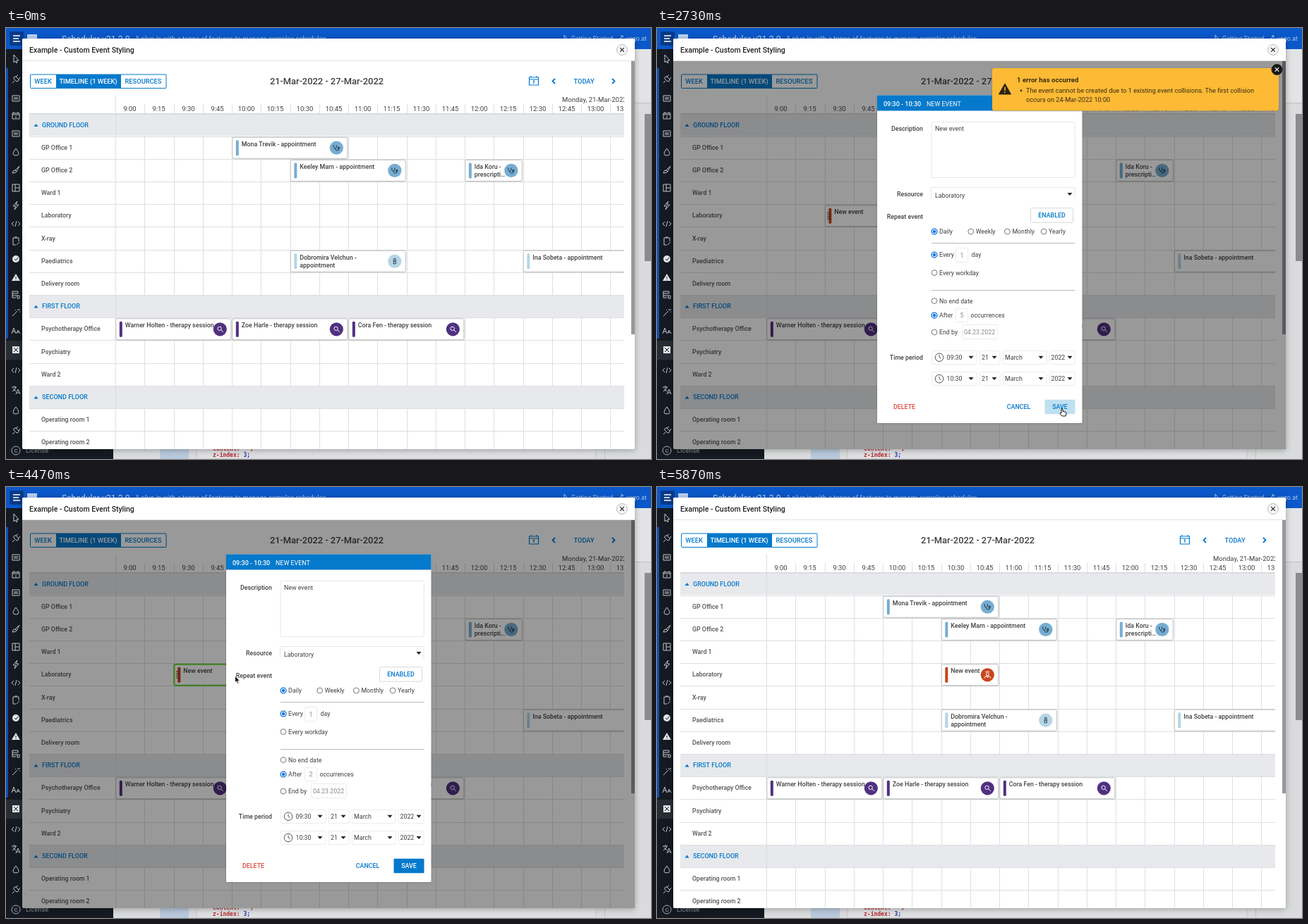
These frames come from a looping animation (914 by 612 pixels, 6010 ms). An HTML page with a canvas:

```html
<!DOCTYPE html>
<html lang="en">
<head>
<meta charset="utf-8">
<title>Scheduler</title>
<style>
html, body { margin: 0; width: 100%; height: 100%; overflow: hidden; background: #fff }
canvas { display: block; width: 914px; height: 612px }
</style>
</head>
<body>
<canvas id="stage" width="914" height="612"></canvas>
<script>
const g = document.getElementById('stage').getContext('2d');
const LOOP = 6010, BLUE = '#0579cb', INK = '#404040', COL = 41.25, ROW = 32.2, LEFT = 155;
const RED = '#c8451b', SKY = '#76add2', PALE = '#b5d5e6', PURPLE = '#503080';

// ---- drawing helpers ----
function text(s, x, y, { size = 8.8, color = INK, weight = 400, align = 'left', font = 'Roboto, sans-serif' } = {}) {
  g.font = `${weight} ${size}px ${font}`;
  g.textAlign = align;
  g.fillStyle = color;
  g.fillText(s, x, y + size * .355);
}
function rect(x, y, w, h, fill, stroke, r = 0, lw = 1) {
  g.beginPath();
  g.roundRect(x, y, w, h, r);
  if (fill) { g.fillStyle = fill; g.fill(); }
  if (stroke) { g.strokeStyle = stroke; g.lineWidth = lw; g.stroke(); }
}
function circle(x, y, r, fill, stroke, lw = 1) {
  rect(x - r, y - r, 2 * r, 2 * r, fill, stroke, r, lw);
}
function line(x1, y1, x2, y2, color, lw = 1) {
  g.beginPath();
  g.moveTo(x1, y1);
  g.lineTo(x2, y2);
  g.strokeStyle = color;
  g.lineWidth = lw;
  g.stroke();
}
function path(d, x, y, stroke, fill, lw = 1) {
  g.save();
  g.translate(x, y);
  const p = new Path2D(d);
  if (fill) { g.fillStyle = fill; g.fill(p); }
  if (stroke) { g.strokeStyle = stroke; g.lineWidth = lw; g.stroke(p); }
  g.restore();
}
function shadowed(blur, color, draw) {
  g.save();
  g.shadowBlur = blur;
  g.shadowColor = color;
  g.shadowOffsetY = blur / 6;
  draw();
  g.restore();
}
const cross = (x, y, r, color) => path(`M${-r} ${-r}L${r} ${r}M${-r} ${r}L${r} ${-r}`, x, y, color, null, 1.2);
const caret = (x, y) => path('M-3.5-2H3.5L0 2Z', x, y, null, '#222');

// ---- page behind the window ----
const PLUG = 'M-5 5L-2 2M-3-1L1 3Q4 3 4 0L0-4Q-4-4-3-1M0-4L3-6M4 0L6-3';
const LIST = 'M-5-4H5V4H-5ZM-3-1H3M-3 1H3';
const DROP = 'M0-5Q-8 5 0 5Q8 5 0-5Z';
const CODE = 'M-3-3L-6 0-3 3M3-3L6 0 3 3M1-4L-1 4';
const SIDE = [
  [44, 'M-3-6V5L-1 3 1 6 2 5 1 2H4Z'], [73, PLUG], [100, LIST],
  [125, 'M-5-4H5V4H-5ZM-5-2H5M-3-6V-4M3-6V-4M0 0V3'], [150, LIST], [176, DROP],
  [201, 'M5-5L-1 1 1 3ZM-1 1Q-4 0-5 5Q0 5 1 3'], [227, 'M-5-5H5V5H-5ZM-1-5V5M-1 0H5'],
  [252, 'M2-6L-4 1H0L-2 6 4-1H0Z'], [278, CODE], [303, 'M-4-5H4V0M-4-5V5H0M-2-6H2M1 5L5 1'],
  [328, 'M-2 0L0 2 3-2'], [354, 'M0-1V2M0 3V4'],
  [379, 'M-5-5H3V-2H-5ZM-5-2V4H0M-5 1H2M2 1H5V5H2Z'],
  [404, 'M-5 5L2-2M3-5V-3M5-1H6M-1-4L0-3M4-3L6-5'], [430, 'M-6 4L-3-4 0 4M-5 1H-1M1 4L3-1 6 4M2 2H5'],
  [457, 'M-3-3L3 3M3-3L-3 3'], [486, CODE],
  [514, 'M-6-4H1M-2-6V-4M-5 2Q-1 0 0-4M-4-2L0 2M0 6L3-1 6 6M1 4H5'], [543, DROP], [572, PLUG]
];
const BADGES = { 328: 'M5 0A5 5 0 1 1-5 0A5 5 0 1 1 5 0', 354: 'M0-5L6 5H-6Z', 457: 'M-5-5H5V5H-5Z' };
function page() {
  rect(0, 0, 914, 612, '#dadbdd');
  rect(0, 0, 914, 30, '#0a58c9');
  rect(891, 30, 23, 76, '#e2e3e5');
  line(891, 106.5, 914, 106.5, '#bfc0c2');
  rect(905, 122, 9, 209, '#8c8c8e');
  rect(5, 5, 20, 20, '#093a88', null, 2);
  path('M-5-4H5M-5 0H3M-5 4H5', 15, 15, '#fff', null, 1.5);
  rect(30, 9, 14, 14, '#bcd2f2');
  text('Scheduler v21.2.0', 79, 15.5, { size: 12.2, color: '#c5d8f3' });
  text('A plug-in with a tonne of features to manage complex schedules.', 183, 15, { size: 9.5, color: '#b0c9ee' });
  path('M-2-4V4L0 2 3 2Z', 793, 14, '#a9c4ee');
  text('Getting Started', 801, 15, { color: '#b0c9ee' });
  path('M-3 3L3-3M0-3H3V0', 871, 14, '#b0c9ee');
  text('veqo.at', 879, 15, { color: '#b0c9ee' });
  rect(0, 30, 152, 582, '#151a22');
  rect(0, 57, 3, 384, '#0b4fb9');
  rect(0, 444, 23, 27, '#272d35');
  for (const [y, d] of SIDE) {
    if (BADGES[y]) path(BADGES[y], 14, y, null, '#e4e5e7');
    path(d, 14, y, BADGES[y] ? '#151a22' : '#c2c6cb');
  }
  circle(14, 600, 6, null, '#aab0b8');
  text('C', 14, 600, { size: 8, color: '#aab0b8', align: 'center' });
  text('License', 28, 600, { size: 9.4, color: '#8b929b' });
  rect(218, 590, 41, 22, '#b9c9dc');
  rect(270, 590, 566, 22, '#dedfe1', '#c5c6c8');
  line(848.5, 590, 848.5, 612, '#c2c3c5');
  const mono = { size: 8, weight: 700, font: '"DejaVu Sans Mono", monospace', color: '#b3262b' };
  text("content: '';", 293, 597, mono);
  text('z-index:', 293, 606, mono);
  text('3;', 336.4, 606, { ...mono, color: '#2838b0' });
}

// ---- schedule ----
const GROUPS = { 0: 'GROUND FLOOR', 8: 'FIRST FLOOR', 12: 'SECOND FLOOR' };
const ROOMS = ['', 'GP Office 1', 'GP Office 2', 'Ward 1', 'Laboratory', 'X-ray', 'Paediatrics', 'Delivery room', '',
  'Psychotherapy Office', 'Psychiatry', 'Ward 2', '', 'Operating room 1', 'Operating room 2'];
const rowY = n => 137.5 + ROW * n;
const colX = n => LEFT + COL * n;
const ICONS = {
  steth: ['#20303c', 'M-4-4V-1Q-2 3 0-1V-4M-2 1Q-1 5 3 3V1M2-1H4V1H2Z'],
  baby: ['#24343f', 'M1.5-2.5A1.5 1.5 0 1 1-1.5-2.5A1.5 1.5 0 1 1 1.5-2.5M-2.5 0H2.5M-1 1L-2 3 0 4 2 3 1 1'],
  lens: ['#fff', 'M2-1A2.7 2.7 0 1 1-3.4-1A2.7 2.7 0 1 1 2-1M1.5 1L4.5 4'],
  medic: ['#fff', 'M2-1A2 2 0 1 1-2-1A2 2 0 1 1 2-1M-3-4Q0-6 3-4M-4.5 5Q-4 1 0 2Q4 1 4.5 5M-2 2L0 4 2 2']
};
const EVENTS = [
  [4, 4, 1, ['Mona Trevik - appointment'], SKY, 'steth'],
  [6, 4, 2, ['Keeley Marn - appointment'], SKY, 'steth'],
  [12, 2, 2, ['Ida Koru -', 'prescripti…'], SKY, 'steth'],
  [6, 4, 6, ['Dobromira Velchun -', 'appointment'], PALE, 'baby'],
  [14, 6, 6, ['Ina Sobeta - appointment'], PALE, 'baby'],
  [0, 4, 9, ['Warner Holten - therapy session'], PURPLE, 'lens'],
  [4, 4, 9, ['Zoe Harle - therapy session'], PURPLE, 'lens'],
  [8, 4, 9, ['Cora Fen - therapy session'], PURPLE, 'lens']
];
function handle(x, y) {
  for (let i = 0; i < 8; i++) rect(x + i % 2 * 2.5, y - 5 + (i >> 1) * 3, 1.5, 1.5, '#56392f');
}
function event([col, span, row, lines, color, icon], selected, handles) {
  const x = colX(col) + .8, y = rowY(row), w = COL * span - 2;
  shadowed(2, 'rgba(0,0,0,.3)', () => rect(x, y - 14.5, w, 30, '#fff', null, 2));
  rect(x, y - 14.5, w, 30, null, selected ? '#62d42c' : '#c6c6c8', 2, selected ? 2 : 1);
  rect(x + 5, y - 10.5, 4, 22, color, null, 1.5);
  g.save();
  g.beginPath();
  g.rect(x + 12, y - 15, w - 36, 30);
  g.clip();
  lines.forEach((s, i) => text(s, x + 13, y - 5 + i * 11, { weight: 500 }));
  g.restore();
  circle(x + w - 15.5, y + .5, 9.6, color);
  path(ICONS[icon][1], x + w - 15.5, y + .5, ICONS[icon][0]);
  if (handles) {
    handle(x + 3, y);
    handle(x + w - 8, y);
  }
}
function schedule(t) {
  g.save();
  g.beginPath();
  g.rect(33, 47, 843, 551);
  g.clip();
  text('Monday, 21-Mar-2022', 788, 102, { size: 9.5 });
  for (let i = 0; i < 18; i++) {
    const x = Math.round(colX(i)) + .5, min = 540 + 15 * i;
    line(x, i ? 108 : 96, x, 598, '#dedfe1');
    text(`${min / 60 | 0}:${String(min % 60).padStart(2, '0')}`, x + 20, 115, { size: 9.5, align: 'center' });
  }
  ROOMS.forEach((room, n) => {
    const y = rowY(n), top = Math.round(y - ROW / 2) + .5;
    if (GROUPS[n]) {
      rect(33, top, 843, 31.7, '#e7e9ec');
      line(LEFT + .5, top, LEFT + .5, top + 32, '#d9dbde');
      path('M-3 2H3L0-2Z', 42.5, y + .5, null, BLUE);
      text(GROUPS[n], 51, y, { size: 9, weight: 500, color: BLUE });
    } else text(room, 50, y, { weight: 500, color: '#555' });
    line(33, top, 876, top, '#dedfe1');
  });
  line(33, 122, 876, 122, '#d2d4d6');
  EVENTS.forEach(e => event(e));
  if (t > 190 && t < 490) {
    const span = Math.max(1, Math.round((pointer(t).x - 237.5) / COL));
    rect(colX(2), rowY(4) - 15, span * COL, 31, 'rgba(5,121,203,.25)');
  }
  if (t >= 490) {
    const x = pointer(t).x, clamp = (v, max) => Math.max(0, Math.min(max, Math.round(v)));
    const shift = t < 5160 ? 0 : t < 5410 ? clamp((x - 320) / COL, 4) : 4;
    const cut = t < 5560 ? 0 : t < 5710 ? clamp((563 - x) / COL, 2) : 2;
    event([2 + shift, 4 - cut, 4, ['New event'], RED, 'medic'], t > 4200 && t < 5735, t < 5735);
  }
  g.restore();
}
function windowFrame() {
  shadowed(8, 'rgba(0,0,0,.3)', () => rect(23, 15, 868, 583, '#fff', null, 2));
}
function toolbar() {
  const b = { size: 9.3, weight: 500, color: BLUE, align: 'center' };
  rect(34.5, 66, 192.5, 19.5, '#fff', BLUE, 1);
  rect(71, 66, 92, 19.5, BLUE);
  text('WEEK', 52.5, 76, b);
  text('TIMELINE (1 WEEK)', 116.5, 76, { ...b, color: '#fff' });
  text('RESOURCES', 194.5, 76, b);
  text('21-Mar-2022 - 27-Mar-2022', 454.5, 75.5, { size: 12.9, weight: 500, align: 'center' });
  path('M-6.5-5H6.5V6H-6.5ZM-6.5-2H6.5M-4-7V-5M4-7V-5M-1 1L0 0V4', 748, 75, BLUE, null, 1.2);
  path('M2-3.5L-1.5 0 2 3.5', 776, 75.5, BLUE, null, 1.8);
  text('TODAY', 819, 76, b);
  path('M-2-3.5L1.5 0-2 3.5', 861, 75.5, BLUE, null, 1.8);
  rect(886, 47, 5, 388, '#98989a');
}
function titleBar() {
  rect(23, 15, 868, 31, '#fff', null, [2, 2, 0, 0]);
  line(23, 46.5, 891, 46.5, '#e4e4e6');
  text('Example - Custom Event Styling', 33, 31, { size: 10.5, weight: 500, color: '#222' });
  circle(873, 31, 7.5, '#f6f6f6', '#bbb');
  cross(873, 31, 2.8, '#222');
}

// ---- event form ----
const field = (x, y, w, h) => rect(x + .5, y + .5, w, h, '#fff', '#ececec', 1);
function radio(x, y, label, on) {
  circle(x, y, 3.9, '#fff', on ? '#0b72dc' : '#777', on ? 1.3 : 1);
  if (on) circle(x, y, 2.2, '#0b72dc');
  text(label, x + 7, y);
}
function button(label, x, y, w, { fill, border, color = BLUE } = {}) {
  rect(x, y - 10.3, w, 20.5, fill, border, 1);
  text(label, x + w / 2, y, { size: 8.9, weight: 500, color, align: 'center' });
}
function form(t) {
  const open = t > 960, off = open ? 168 : 0, focus = t < 940;
  const label = (s, y) => text(s, 377, y, { weight: 500, align: 'right' });
  shadowed(3, 'rgba(0,0,0,.2)', () => rect(312, 95.5, 290.5, 297.5 + off, '#fff', null, 1));
  rect(312, 95.5, 290.5, 22, BLUE, null, [1, 1, 0, 0]);
  text('09:30 - 10:30', 321, 108, { size: 9, weight: 500, color: '#fff' });
  text('NEW EVENT', 382, 108, { size: 8.9, color: '#fff' });
  label('Description', 142.5);
  rect(389, 133.5, 203.3, 79, '#fff', focus ? '#3b9fda' : '#e8e8e8', 1, focus ? 1.6 : 1);
  if (focus) rect(394, 136.5, 42, 12, '#a9cdf0');
  text('New event', 394, 142.5);
  label('Resource', 235.5);
  path('M0 17V0H203.5V17', 388.5, 226.5, '#e6e6e6');
  text('Laboratory', 394, 238);
  caret(585, 236);
  label('Repeat event', 267.5);
  const bordered = { border: '#d8d8d8', fill: '#fff' };
  open ? button('ENABLED', 529.5, 266, 60, bordered) : button('DISABLED', 527.5, 266, 62, bordered);
  if (open) {
    const muted = { color: '#888', align: 'center' }, after = t > 1345;
    ['Daily', 'Weekly', 'Monthly', 'Yearly'].forEach((s, i) => radio(393 + 51.7 * i, 289, s, !i));
    line(389, 305.5, 592.5, 305.5, '#bbb');
    radio(393, 322, 'Every', true);
    field(423, 312, 17, 20);
    text('1', 432, 322.5, muted);
    text('day', 445.5, 322);
    radio(393, 347.5, 'Every workday');
    line(389, 372.5, 592.5, 372.5, '#bbb');
    radio(393, 387.5, 'No end date', !after);
    radio(393, 408, 'After', after);
    field(423, 398, 17, 19);
    text(t < 1860 ? '1' : t < 3400 ? '5' : '2', 432, 408, muted);
    text('occurrences', 444.5, 408);
    radio(393, 432, 'End by');
    field(432, 421, 50, 20);
    text('04.23.2022', 457, 432, muted);
  }
  label('Time period', 300 + off);
  ['09:30', '10:30'].forEach((time, i) => {
    const y = 299.7 + off + 30.4 * i, top = Math.round(y - 10);
    [[389, 64], [457, 29], [490, 62], [556, 36]].forEach(([x, w]) => field(x, top, w - .5, 19));
    circle(400, y, 5.8, null, '#555');
    path('M0-3.5V0L2.5 1.5', 400, y, '#555');
    text(time, 410.5, y);
    text('21', 460, y);
    text('March', 493, y);
    text('2022', 558.5, y);
    [445, 478, 544, 585].forEach(x => caret(x, y));
  });
  const y = 370 + off;
  const saveHover = t > 2250 && t < 2830 || t > 3560 && t < 3700, cancelHover = t > 4800;
  button('DELETE', 330, y, 41, { color: '#db4a3d' });
  button('CANCEL', 485, y, 55, cancelHover ? { fill: '#bfe0f1' } : {});
  button('SAVE', 549.5, y, 43, saveHover ? { fill: '#bfe0f1' } : { fill: BLUE, color: '#fff' });
}
function errorBox() {
  shadowed(3, 'rgba(0,0,0,.2)', () => rect(475, 57, 406, 60.5, '#fdba35', null, 3));
  path('M0-8L8.5 7H-8.5Z', 493, 87, '#2a2417', '#2a2417', 1);
  path('M0-3V2M0 3.5V5', 493, 87, '#fdba35', null, 1.6);
  text('1 error has occurred', 510, 73.7, { size: 9.6, weight: 700, color: '#3a2d10' });
  const body = { size: 9.15, color: '#3a2d10' };
  circle(516, 89, 1.4, '#3a2d10');
  text('The event cannot be created due to 1 existing event collisions. The first collision', 523, 89, body);
  text('occurs on 24-Mar-2022 10:00', 523, 101.7, body);
  circle(878.5, 59, 7.6, '#151515', '#333');
  cross(878.5, 59, 2.8, '#fff');
}

// ---- pointer: time, x, y, shape ----
const TRACK = [
  [30, 250, 620, 'arrow'], [170, 241, 267], [200, 241, 267], [470, 403, 267], [700, 403, 267],
  [880, 558, 267, 'hand'], [1010, 558, 267, 'arrow'], [1300, 394, 408], [1390, 394, 408],
  [1520, 436.5, 407.5, 'beam'], [2040, 436.5, 407.5, 'arrow'], [2290, 574, 540, 'hand'],
  [2790, 574, 540, 'arrow'], [2970, 878, 59, 'hand'], [3060, 878, 59, 'arrow'],
  [3250, 436.5, 407.5, 'beam'], [3430, 436.5, 407.5, 'arrow'], [3590, 574, 540, 'hand'],
  [3700, 574, 540, 'arrow'], [4050, 323, 266, 'hand'], [4450, 323, 266, 'arrow'],
  [4840, 513, 539, 'hand'], [4960, 513, 539, 'arrow'], [5130, 320, 266, 'hand'], [5170, 320, 266],
  [5400, 485, 266], [5440, 485, 266], [5535, 563, 266], [5570, 563, 266], [5700, 482, 266],
  [5730, 482, 266, 'arrow'], [5800, 537, 450], [5870, 538, 625]
];
const PRESSES = [[190, 480], [920, 980], [1330, 1370], [1620, 1680], [2340, 2420], [2990, 3050], [3270, 3330],
  [3610, 3670], [4205, 4290], [4370, 4420], [4870, 4950], [5150, 5420], [5550, 5715]];
function pointer(t) {
  let shape = 'arrow', i = 0;
  for (; i < TRACK.length - 2 && TRACK[i + 1][0] <= t; i++) shape = TRACK[i][3] || shape;
  shape = TRACK[i][3] || shape;
  const [t0, x0, y0] = TRACK[i], [t1, x1, y1] = TRACK[i + 1];
  const k = Math.max(0, Math.min(1, (t - t0) / (t1 - t0))), e = i == TRACK.length - 2 ? k : k * k * (3 - 2 * k);
  return { x: x0 + (x1 - x0) * e, y: y0 + (y1 - y0) * e, shape };
}
function drawPointer(t) {
  if (t < 30 || t >= 5865) return;
  const { x, y, shape } = pointer(t);
  if (PRESSES.some(([a, b]) => t >= a && t < b)) circle(x, y, 18.4, 'rgba(255,255,255,.25)', '#111', 2.3);
  if (shape == 'arrow') path('M0 0V9.5L2.2 7.5 3.7 11 5.3 10.3 3.8 7H6.8Z', x, y, '#fff', '#111', .8);
  if (shape == 'hand') path('M-1 1Q0-1 1 1V4.5Q2 3.6 3 5Q4 4.2 5 5.6Q6.4 5.4 6 8L5 11H0L-3 7.5Q-3 6-1 7Z', x, y, '#111', '#fff', 1);
  if (shape == 'beam') path('M-2-5.5Q0-5.5 0-4Q0-5.5 2-5.5M0-4V4M-2 5.5Q0 5.5 0 4Q0 5.5 2 5.5M-1 1H1', x, y, '#111', null, 1.3);
}

function draw() {
  const t = performance.now() % LOOP;
  page();
  windowFrame();
  schedule(t);
  toolbar();
  if (t > 500 && t < 3700 || t > 4440 && t < 4965) {
    rect(23, 46, 868, 552, 'rgba(0,0,0,.4)');
    form(t);
  }
  titleBar();
  if (t > 2450 && t < 3040) errorBox();
  drawPointer(t);
  requestAnimationFrame(draw);
}
draw();
</script>
</body>
</html>
```
